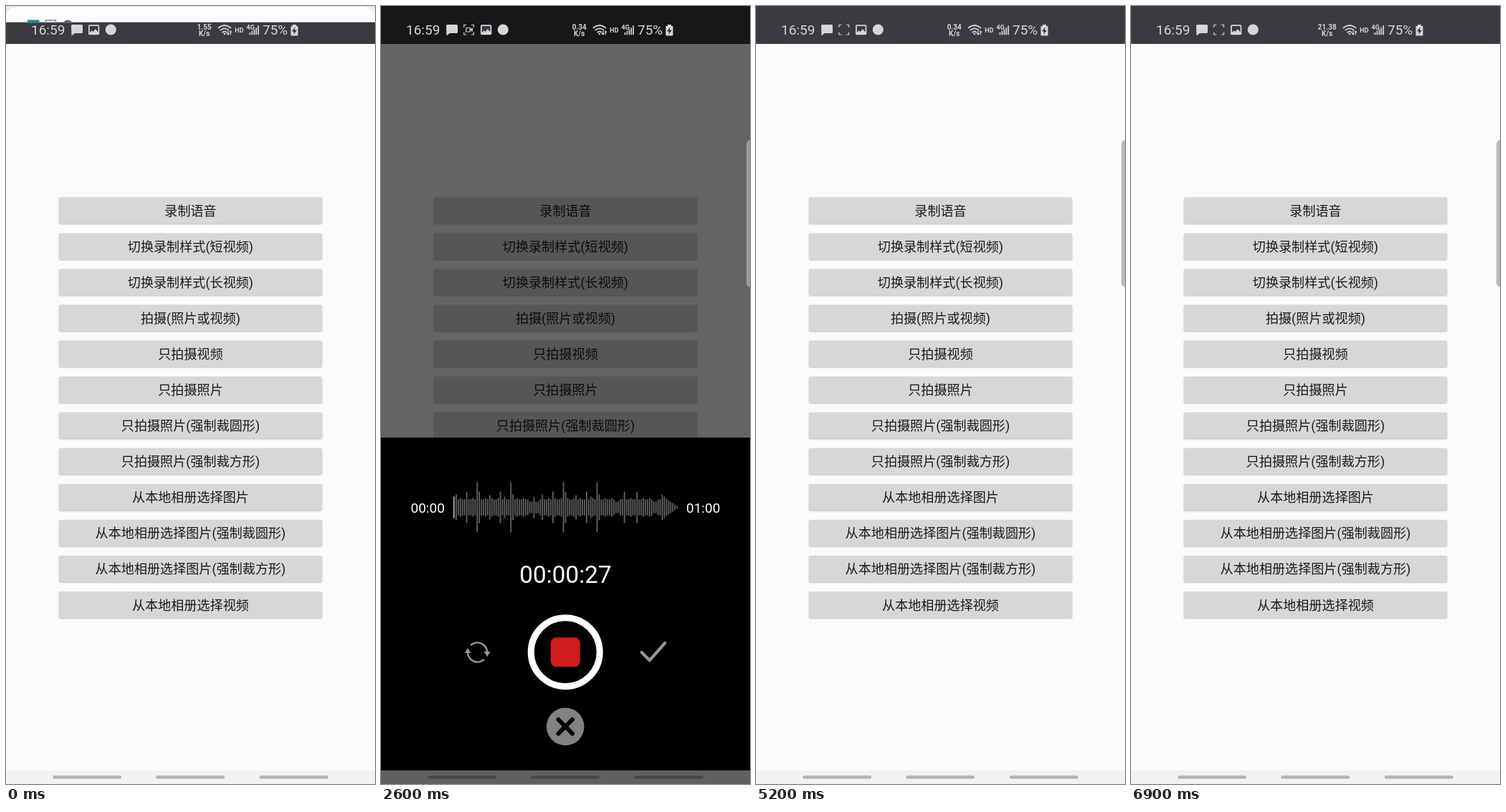
Write an HTML page that moves like this. It is 515 px wide and 1087 px high and loops after 7000 ms.

```html
<!DOCTYPE html>
<html lang="zh-CN">
<head>
<meta charset="utf-8">
<title>录制语音</title>
<style>
  html, body { margin: 0; width: 100%; height: 100%; overflow: hidden; background: #fbfbf9; }
  svg { display: block; width: 515px; height: 1087px; }
  text { font-family: Roboto, "Noto Sans CJK SC", "Noto Sans CJK", sans-serif; white-space: pre; }
  .mid { text-anchor: middle; }
  .line { fill: none; stroke: currentColor; stroke-linecap: round; stroke-linejoin: round; }
  .button rect { fill: #d6d7d7; filter: drop-shadow(0 1.2px 1px #0004); }
  .button text { font-size: 18.1px; fill: #1b1b1b; }

  /* One loop is 7 s, so 1% is 70 ms */
  .anim { animation: 7s linear infinite; }
  .hard { animation: 7s step-end infinite; }

  #shade { animation-name: shade; }
  @keyframes shade { 0% { visibility: visible } 1.4%, 100% { visibility: hidden } }

  #edge, #recorder { animation-name: appear; }
  @keyframes appear { 0% { visibility: hidden } 5.7%, 100% { visibility: visible } }

  #shift { animation-name: shift; }
  @keyframes shift { 0% { transform: translateX(-24px) } 5.7%, 100% { transform: none } }

  #blink { animation: blink 1s step-end infinite; }
  @keyframes blink { 0%, 79%, 100% { opacity: 0 } 26% { opacity: 1 } }

  .dim { animation-name: dim; opacity: 0; }
  @keyframes dim { 0%, 17.1%, 73.7%, 100% { opacity: 0 } 20%, 72.3% { opacity: .6 } }

  #sheet { animation-name: sheet; }
  @keyframes sheet {
    0%, 73.7%, 100% { transform: translateY(484px) }
    17.1% { transform: translateY(484px); animation-timing-function: ease-out }
    21.4%, 72.3% { transform: none }
  }

  #stop { animation-name: stop; }
  @keyframes stop { 0%, 64.1%, 100% { visibility: hidden } 33.2% { visibility: visible } }
  #start { animation-name: start; }
  @keyframes start { 0%, 64.1%, 100% { visibility: visible } 33.2% { visibility: hidden } }
  #close { animation-name: close; }
  @keyframes close { 0%, 64.1%, 100% { fill: #fff } 33.2% { fill: #828282 } }
  #tools { animation-name: tools; }
  @keyframes tools { 0% { color: #969696 } 64.1%, 100% { color: #fff } }

  #upload { animation-name: upload; }
  @keyframes upload { 0%, 77.1%, 95%, 100% { opacity: 0 } 80%, 92.9% { opacity: 1 } }
  #bar { animation-name: bar; transform-box: fill-box; transform-origin: left; }
  @keyframes bar { 0%, 80% { transform: scaleX(0) } 84.2%, 100% { transform: none } }
  #done { animation-name: done; }
  @keyframes done { 0% { visibility: hidden } 84.2%, 100% { visibility: visible } }

  #touch { animation-name: touch; }
  @keyframes touch {
    0%, 17.1%, 33.2%, 64.1%, 72.3%, 92.8%, 100% { opacity: 0 }
    15.7% { opacity: .36; transform: translate(258px, 288px) }
    31.4%, 62.8% { opacity: .36; transform: translate(257px, 905px) }
    70.7% { opacity: .36; transform: translate(379px, 906px) }
    91.4% { opacity: .36; transform: translate(472px, 86px) }
  }
</style>
</head>
<body>
<svg viewBox="0 0 515 1087">
  <defs>
    <clipPath id="played"><rect id="playedBox" x="100" y="660" width="0" height="80"/></clipPath>
    <clipPath id="aboveNav"><rect width="515" height="1068"/></clipPath>
    <g id="turn">
      <path class="line" stroke-width="2.4" d="M126 892.5A13.7 13.7 0 0 1 148.2 903"/>
      <path fill="currentColor" d="M143.500 902h9l-4.200 7z"/>
    </g>
  </defs>

  <!-- Menu -->
  <rect width="515" height="1087" fill="#fbfbf9"/>
  <rect width="515" height="53" fill="#3a3a40"/>
  <g id="menu"></g>

  <!-- Recorder sheet -->
  <rect class="dim anim" width="515" height="1068"/>
  <g clip-path="url(#aboveNav)">
    <g id="sheet" class="anim">
      <rect y="603" width="515" height="484"/>
      <g fill="#fff" font-size="19">
        <text id="elapsed" x="41.5" y="708">00:00</text>
        <text x="426" y="708">01:00</text>
        <text id="timer" class="mid" x="257.5" y="805.8" font-size="33.3">00:00:00</text>
      </g>
      <path id="wave" fill="none" stroke-width="1.8" stroke="#626262"/>
      <path id="waveLit" fill="none" stroke-width="1.8" stroke="#b4beb9" clip-path="url(#played)"/>
      <circle cx="257.3" cy="902.7" r="48" fill="none" stroke="#fff" stroke-width="9"/>
      <circle id="start" class="hard" cx="257.3" cy="902.7" r="40.8" fill="#d21c1a"/>
      <rect id="stop" class="hard" x="236.8" y="882.3" width="41" height="41" rx="8" fill="#d01c1a"/>
      <g id="tools" class="hard">
        <use href="#turn"/>
        <use href="#turn" transform="rotate(180 134.6 903)"/>
        <path class="line" stroke-width="4.2" d="M363.8 903l11 11.300L396.300 890"/>
      </g>
      <circle id="close" class="hard" cx="257.3" cy="1006.8" r="26.3"/>
      <path class="line" stroke-width="6" color="#000" d="M247.5 997l19.6 19.6m0-19.6l-19.6 19.6"/>
    </g>
  </g>

  <!-- Upload page -->
  <g id="upload" class="anim">
    <rect width="515" height="1087" fill="#fcfcfa"/>
    <rect width="515" height="113" fill="#3a3a40"/>
    <rect y="112" width="515" height="1.2" fill="#202024"/>
    <path class="line" stroke-width="2.5" color="#fff" d="M39 83.7H22m8.5-9l-9 9 9 9"/>
    <text class="mid" x="265.3" y="92.5" font-size="23.4" fill="#fff">上传进度</text>
    <rect x="438" y="64.5" width="67.5" height="38.5" rx="3.5" fill="#1aad19"/>
    <path d="M442 102.5h48" stroke="#0a2a0a"/>
    <text class="mid" x="471.7" y="90.5" font-size="18.1" fill="#fff">确定</text>
    <rect x="27.5" y="141" width="460" height="100" rx="12" fill="#fff" stroke="#dedede" style="filter: drop-shadow(0 1px 2px #0004)"/>
    <path class="line" stroke-width="3.6" color="#44d8bf" d="M51.3 183v16M61.3 179.5v24M71.5 187v9M82.5 183v16M93 179.5v24M104.3 187v10"/>
    <rect id="bar" class="anim" x="140" y="204.5" width="335" height="5.5" rx="2.7" fill="#44d8bf"/>
    <g id="done" class="hard">
      <text x="140.5" y="193" font-size="18" fill="#808080">上传成功！</text>
      <g class="line" color="#484848" stroke-width="1.9">
        <circle cx="465.3" cy="182.7" r="9.2"/>
        <path d="M461 183l3.2 3.2 6-6.4"/>
      </g>
    </g>
  </g>

  <!-- System bars -->
  <g>
    <rect y="1068" width="515" height="19" fill="#f2f2f1"/>
    <path d="M67.5 1077.5h91.5M211.5 1077.5h91.5M356 1077.5h91.5" stroke="#b4b4b4" stroke-width="4.6" stroke-linecap="round"/>
    <rect class="dim anim" y="1068" width="515" height="19"/>
  </g>

  <g fill="#d6d6d9" color="#d6d6d9">
    <text x="35" y="40.3" font-size="19">16:59</text>
    <path d="M92.5 26h13q1.5 0 1.5 1.5v9q0 1.5-1.5 1.5H96l-4.5 3.5L91 27.5q0-1.500 1.500-1.500z"/>
    <g id="recorder" class="hard">
      <path class="line" stroke-width="1.2" d="M115.800 29.500v-3h3M126.500 26.500h3v3M129.500 37v3h-3M118.800 40h-3v-3"/>
      <path id="blink" class="line" stroke-width="1.2" d="M118.800 30.500h5.500v5.500h-5.500zM124.800 33.200l2.500-2v4z"/>
    </g>
    <g id="shift" class="hard">
      <rect x="139" y="26.2" width="15.3" height="14" rx="1.8"/>
      <path fill="#3a3a40" d="M140.800 28h11.700v8.500l-3.700-4.300-3.200 3.800-2-1.800-2.800 3z"/>
      <circle cx="170.3" cy="33" r="7.6"/>
    </g>
    <g class="mid" font-size="10" font-weight="700">
      <text id="speed" y="33">1.55</text>
      <text id="unit" y="42">K/s</text>
    </g>
    <path class="line" stroke-width="1.7" d="M296.5 30.5q8.5-7 17 0M299.3 33.700q5.700-4.600 11.500 0M302.200 36.800q2.900-2.200 5.600 0"/>
    <circle cx="305" cy="39" r="1.3"/>
    <path class="line" stroke-width="1.1" d="M310 35v5m-1.5-1.5l1.5 1.5 1.5-1.5M313.5 40v-5m-1.3 1.5l1.3-1.5 1.3 1.5"/>
    <text x="319.3" y="36.5" font-size="9" font-weight="700">HD</text>
    <text x="335.5" y="32.5" font-size="9" font-weight="700">4G</text>
    <path d="M340.5 40.3v-3.3M343.5 40.3v-5.5M346.5 40.3v-7.5M349.300 40.300v-10M352.200 40.300v-13" stroke="currentColor" stroke-width="1.7"/>
    <text x="358" y="40.3" font-size="19">75%</text>
    <path d="M400 26h5v2h1.5q1 0 1 1v11.5q0 1-1 1h-8q-1 0-1-1V29q0-1 1-1h1.5z"/>
    <path fill="#2a2a2e" d="M403.5 29.5l-4.3 6h2.8l-.6 4.300 4.500-6.100h-3z"/>
  </g>

  <g id="shade" class="hard">
    <rect width="515" height="22.5" fill="#ececec"/>
    <path d="M0 22.5V16Q2 1 20 1h475q18 0 20 15v6.5z" fill="#fdfdfd"/>
    <rect x="30" y="19.5" width="16.5" height="4.5" fill="#2f7f8a"/>
    <path d="M55.5 24v-4h14v4" fill="none" stroke="#85858a" stroke-width="1.5"/>
    <path d="M79 24q7-9 14 0z" fill="#606066"/>
  </g>

  <rect id="edge" class="hard" x="510" y="187" width="14" height="206" rx="6" fill="#a3ada8" opacity=".78"/>
  <circle id="touch" class="hard" r="15" fill="#fff"/>
</svg>

<script>
const $ = id => document.getElementById(id);

const labels = [
  '录制语音', '切换录制样式(短视频)', '切换录制样式(长视频)', '拍摄(照片或视频)',
  '只拍摄视频', '只拍摄照片', '只拍摄照片(强制裁圆形)', '只拍摄照片(强制裁方形)',
  '从本地相册选择图片', '从本地相册选择图片(强制裁圆形)',
  '从本地相册选择图片(强制裁方形)', '从本地相册选择视频'
];
$('menu').innerHTML = labels.map((label, i) => `
  <g class="button" transform="translate(74 ${267.3 + i * 50.08})">
    <rect width="367" height="36.5" rx="2"/>
    <text class="mid" x="183.5" y="25.4">${label}</text>
  </g>`).join('');

// Half heights of the sound bars: tall peaks over an even band, tapering at the end
const peaks = {
  0: 15, 1: 18, 6: 22, 11: 35, 12: 22, 17: 17, 22: 22, 24: 15, 27: 35, 28: 18, 38: 15, 42: 18,
  47: 22, 52: 35, 53: 22, 58: 17, 63: 22, 65: 15, 68: 35, 69: 18, 81: 22, 87: 22, 99: 18, 100: 15
};
const quiet = i => [36, 37, 39, 40, 77, 78, 95, 96].includes(i);
const half = i => peaks[i] || (i > 100 ? (107 - i) * 2 : quiet(i) ? 8 : i % 3 ? 11.3 : 13);
let bars = '';
for (let i = 0; i < 107; i++) bars += `M${102 + i * 2.935} ${700.5 - half(i)}v${2 * half(i)}`;
$('wave').setAttribute('d', bars);
$('waveLit').setAttribute('d', bars);

const LOOP = 7000, STEP = 100, REC_START = 2330, REC_LENGTH = 2160;
const pad = n => String(n).padStart(2, '0');
const speedAt = t => t < 1100 ? '1.55' : t < 2600 ? '1.10' : t < 5600 ? '0.34' : '21.38';
const begin = performance.now();

function draw() {
  const now = (performance.now() - begin) % LOOP;
  const t = Math.floor(now / STEP) * STEP;
  const ms = Math.max(0, Math.min(t - REC_START, REC_LENGTH));
  const sec = pad(Math.floor(ms / 1000));
  $('elapsed').textContent = `00:${sec}`;
  $('timer').textContent = `00:${sec}:${pad(Math.floor(ms % 1000 / 10))}`;
  $('playedBox').setAttribute('width', ms ? 1 + ms * 0.0052 : 0);

  const speed = speedAt(t);
  $('speed').textContent = speed;
  for (const id of ['speed', 'unit']) $(id).setAttribute('x', speed.length > 4 ? 273.7 : 276.7);
  requestAnimationFrame(draw);
}
draw();
</script>
</body>
</html>
```
